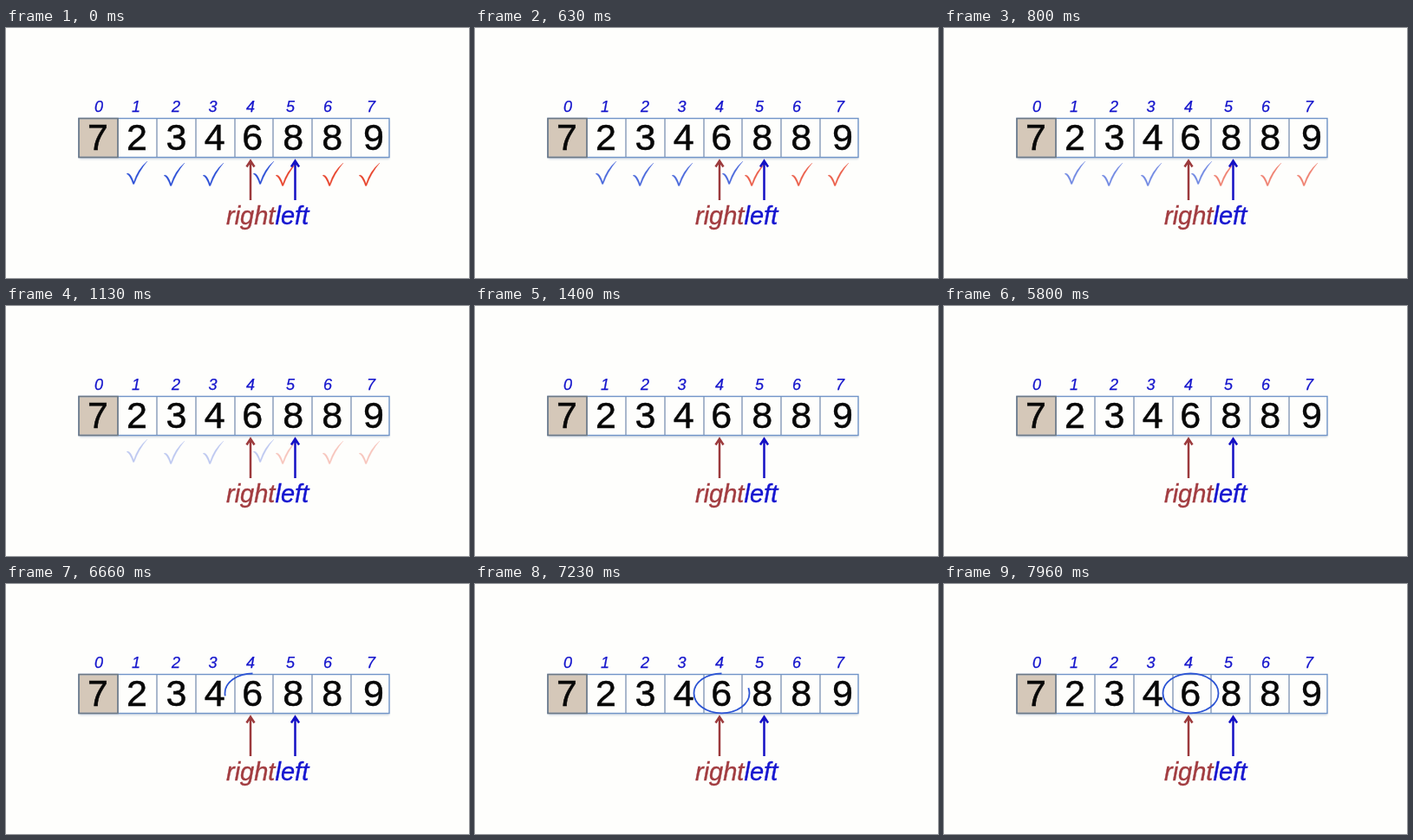
An HTML page for the animation above (8 s loop, 534 px wide and 289 px high).

```html
<!DOCTYPE html>
<html lang="en">
<head>
<meta charset="utf-8">
<title>Partition step</title>
<style>
html, body { margin: 0; width: 100%; height: 100%; overflow: hidden; background: #fefefc; }
svg { display: block; width: 534px; height: 289px; font-family: "Liberation Sans", Arial, sans-serif; }
.digit { font-size: 43px; fill: #080808; stroke: #080808; stroke-width: .5; text-anchor: middle; }
.index { font-size: 18px; font-style: italic; fill: #1414cc; stroke: #1414cc; stroke-width: .25; text-anchor: middle; }
.pointer { font-size: 29px; font-style: italic; stroke-width: .4; }
.arrow { fill: none; stroke-width: 2.5; }
</style>
</head>
<body>
<svg viewBox="0 0 534 289">
  <defs>
    <filter id="soft" x="-20%" y="-20%" width="140%" height="140%"><feGaussianBlur stdDeviation="1.2"/></filter>
    <path id="check" d="M0 14.500Q4 11.500 8.300 24Q13 9 24 0Q14 12 8.800 26.500H7.500Q4 16 0 14.500Z" stroke-width=".3"/>
  </defs>
  <rect x="85" y="106.500" width="357" height="45" fill="#a4b2c4" opacity=".55" filter="url(#soft)"/>
  <rect x="84" y="104.500" width="358" height="45" fill="#fefefc"/>
  <rect x="84" y="104.500" width="45" height="45" fill="#d5c8b9"/>
  <g id="cells"></g>
  <rect x="84" y="104.500" width="358" height="45" fill="none" stroke="#7094c8" stroke-width="1.4"/>
  <rect x="84" y="104.500" width="45" height="45" fill="none" stroke="#6c7884" stroke-width="1.5"/>
  <g id="labels"></g>
  <g id="checks"></g>
  <path class="arrow" stroke="#9c3a3c" d="M282 199V154M277.500 160.500L282 153.500L286.500 160.500"/>
  <path class="arrow" stroke="#1410c4" d="M333.500 199V154M329 160.500L333.500 153.500L338 160.500"/>
  <text class="pointer" x="254" y="226.500" fill="#a23c40" stroke="#a23c40">right</text>
  <text class="pointer" x="310.500" y="226.500" fill="#1616d0" stroke="#1616d0">left</text>
  <path id="ring" pathLength="1" fill="none" stroke="#2c54d4" stroke-width="1.8"
    d="M284.500 103.300A32 23 0 0 0 284.500 149.300A32 23 0 0 0 284.500 103.300"/>
</svg>
<script>
const LOOP = 8000;
const el = id => document.getElementById(id);
const clamp = v => Math.min(1, Math.max(0, v));

const digits = [7, 2, 3, 4, 6, 8, 8, 9];
const digitX = [106, 151, 196.5, 240.8, 284.3, 331.3, 376.3, 424];
const indexX = [107, 150, 196, 238.5, 282, 328, 371, 421];
const dividers = [129, 174, 219, 264, 308, 353, 398];
const marks = [[139, 154], [182, 156], [227, 156], [285, 154], [311, 156], [365, 156], [407, 156]];

el("cells").innerHTML = dividers.map(x =>
  `<path d="M${x} 104.500V149.500" stroke="#8498b8" stroke-width="1.4"/>`).join("");
el("labels").innerHTML = digits.map((d, i) =>
  `<text class="digit" x="${digitX[i]}" y="140.700">${d}</text>
   <text class="index" x="${indexX[i]}" y="97">${i}</text>`).join("");
el("checks").innerHTML = marks.map(([x, y], i) => {
  const color = i < 4 ? "#2c50d6" : "#e8442c";
  return `<use href="#check" x="${x}" y="${y}" fill="${color}" stroke="${color}"/>`;
}).join("");

function draw(now) {
  const t = now % LOOP;
  el("checks").style.opacity = 1 - clamp((t - 500) / 900);
  const drawn = clamp((t - 6365) / 1100);
  el("ring").style.visibility = drawn > 0 ? "visible" : "hidden";
  el("ring").style.strokeDasharray = drawn < 1 ? `${drawn} 2` : "none";
}

let start;
function tick(now) {
  start ??= now;
  draw(now - start);
  requestAnimationFrame(tick);
}
draw(0);
requestAnimationFrame(tick);
</script>
</body>
</html>
```
